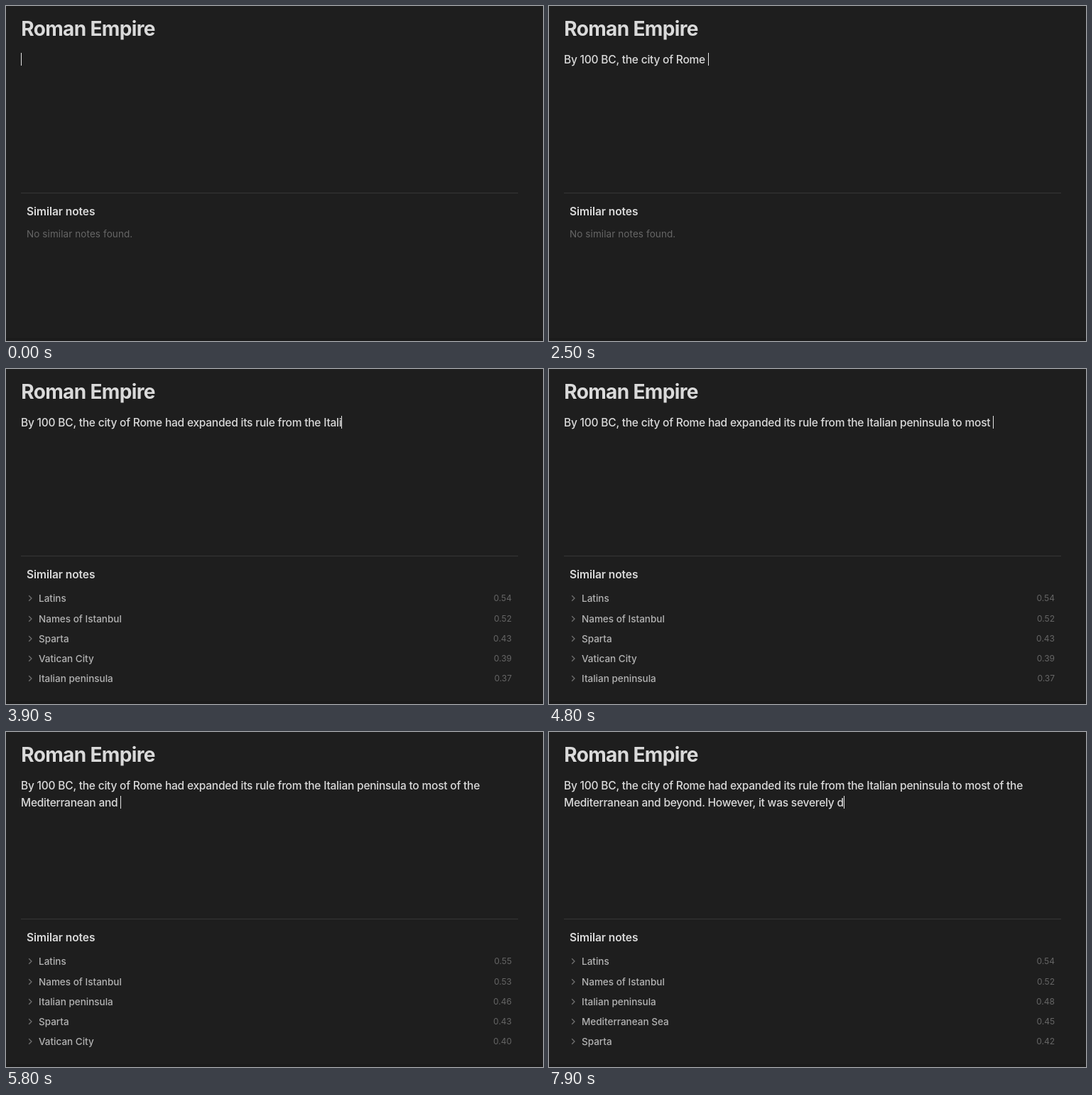
An HTML page that plays this animation: 756 px wide and 472 px high, repeating every 8 s.

```html
<!DOCTYPE html>
<html lang="en">
<head>
<meta charset="utf-8">
<title>Similar notes</title>
<style>
  html, body { margin: 0; width: 100%; height: 100%; overflow: hidden; background: #1e1e1e; }
  body { position: relative; font-family: Inter, Roboto, sans-serif; font-optical-sizing: none; color: #dadada; }
  h1, h2, p, .row, .rule, .edge { position: absolute; margin: 0; }
  h1 { left: 21.3px; top: 12px; font: 700 28px/40px Inter, Roboto, sans-serif; letter-spacing: -0.65px; white-space: nowrap; }
  h2 { left: 29px; top: 278px; font: 600 15.5px/24px Inter, Roboto, sans-serif; letter-spacing: -0.05px; white-space: nowrap; }
  #note { left: 21px; top: 64px; width: 700px; font-size: 15.5px; font-weight: 500; line-height: 24px; letter-spacing: -0.245px; word-spacing: 0.12px; white-space: pre-wrap; }
  #caret { position: relative; }
  #caret::before { content: ""; position: absolute; left: 0; top: -0.5px; width: 1px; height: 18px; background: #e4e4e4; }
  .rule { left: 21px; top: 263px; width: 700px; height: 1px; background: #363636; }
  .edge { left: 0; right: 0; bottom: 0; height: 4px; background: #1b1b1b; }
  .empty { left: 29px; top: 311px; font-size: 13.5px; line-height: 20px; letter-spacing: 0.09px; color: #666; white-space: nowrap; }
  .row { left: 31px; width: 681px; height: 20px; font-size: 13.5px; line-height: 20px; color: #b3b3b3; }
  .row svg { position: absolute; left: 0; top: 5px; fill: none; stroke: #707070; stroke-width: 1.3; }
  .row span { position: absolute; left: 15px; font-weight: 500; white-space: nowrap; }
  .row b { position: absolute; right: 0; font-weight: 400; font-size: 12px; color: #666; }
</style>
</head>
<body>
<h1>Roman Empire</h1>
<p id="note"><span id="typed"></span><span id="caret">&#8203;</span></p>
<div class="rule"></div>
<h2>Similar notes</h2>
<div id="results"></div>
<div class="edge"></div>
<script>
const LOOP = 8000, STEP = 100;
const TEXT = "By 100 BC, the city of Rome had expanded its rule from the Italian peninsula " +
  "to most of the Mediterranean and beyond. However, it was severely d";

// [time in ms, characters typed]
const TYPING = [
  [700, 0], [1200, 10], [1600, 10], [1700, 11], [2500, 28], [3200, 46], [3400, 50],
  [4000, 67], [4100, 67], [4800, 85], [5800, 110], [5900, 113], [6100, 117],
  [6400, 117], [6800, 126], [7100, 126], [7200, 127], [7900, 144]
];

const RESULTS = [
  { at: 0, rows: [] },
  { at: 3600, rows: [["Latins", "0.54"], ["Names of Istanbul", "0.52"], ["Sparta", "0.43"],
    ["Vatican City", "0.39"], ["Italian peninsula", "0.37"]] },
  { at: 5600, rows: [["Latins", "0.55"], ["Names of Istanbul", "0.53"], ["Italian peninsula", "0.46"],
    ["Sparta", "0.43"], ["Vatican City", "0.40"]] },
  { at: 7600, rows: [["Latins", "0.54"], ["Names of Istanbul", "0.52"], ["Italian peninsula", "0.48"],
    ["Mediterranean Sea", "0.45"], ["Sparta", "0.42"]] }
];

const [typed, caret, results] = ["typed", "caret", "results"].map(id => document.getElementById(id));
let shown = null;

function typedCount(t) {
  const next = TYPING.findIndex(([time]) => time > t);
  if (next === 0) return 0;
  if (next < 0) return TEXT.length;
  const [t0, n0] = TYPING[next - 1], [t1, n1] = TYPING[next];
  return Math.round(n0 + (n1 - n0) * (t - t0) / (t1 - t0));
}

function rowHtml([title, score], i) {
  return `<div class="row" style="top:${Math.ceil(313 + i * 28.25)}px">
    <svg width="7" height="10"><path d="M1.2 1.2L5 5L1.2 8.8"/></svg>
    <span>${title}</span><b>${score}</b></div>`;
}

function showResults(state) {
  if (state === shown) return;
  shown = state;
  results.innerHTML = state.rows.map(rowHtml).join("") || '<p class="empty">No similar notes found.</p>';
}

function draw() {
  const t = Math.floor(performance.now() % LOOP / STEP) * STEP;
  typed.textContent = TEXT.slice(0, typedCount(t));
  caret.style.visibility = t >= 100 && t < 600 ? "hidden" : "visible";
  showResults(RESULTS.findLast(state => state.at <= t));
  requestAnimationFrame(draw);
}
draw();
</script>
</body>
</html>
```
